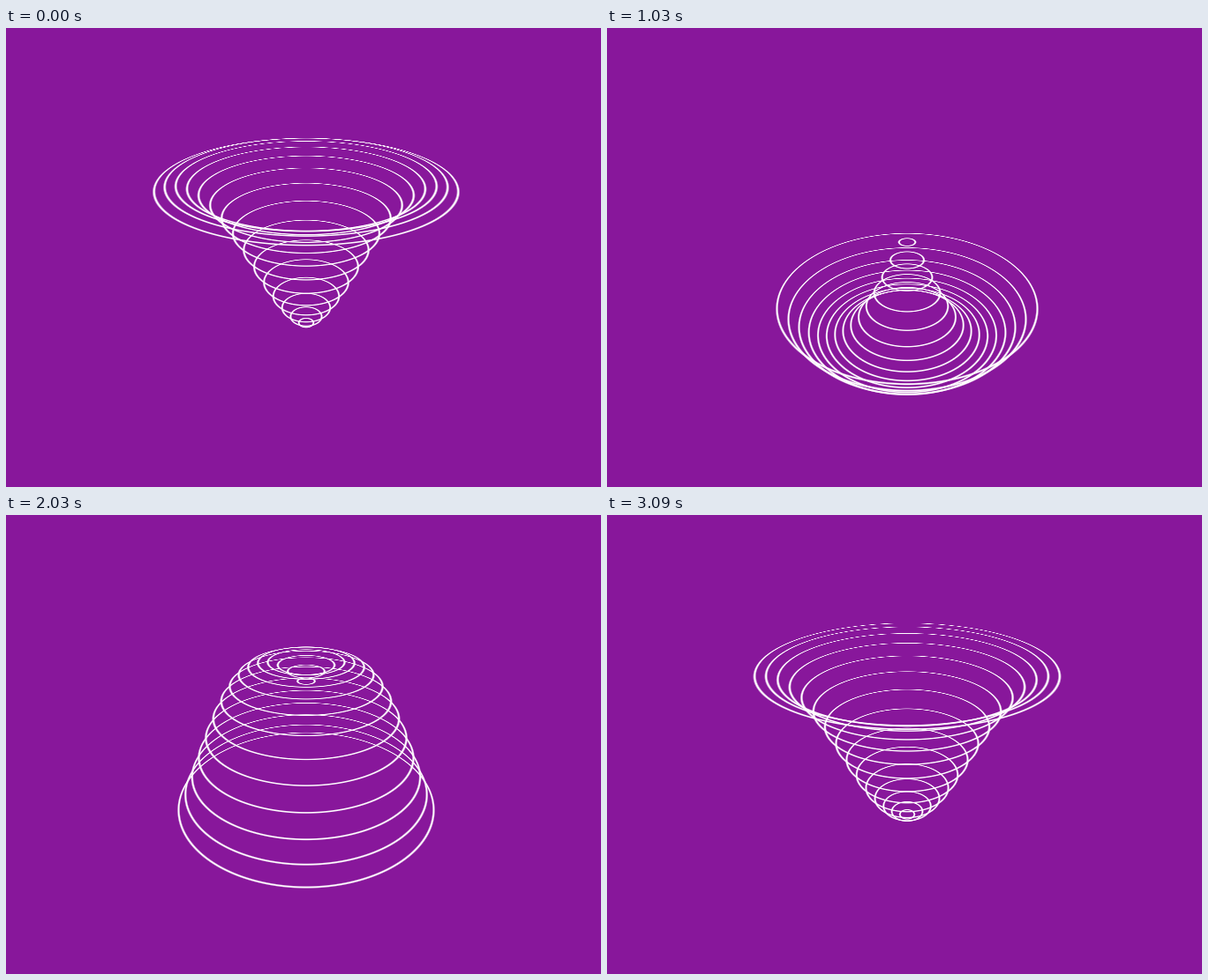
Recreate the animation shown at these times as an HTML page with a canvas. Size 674 by 521 pixels, loop 3.15 s.

```html
<!DOCTYPE html>
<html lang="en">
<head>
<meta charset="utf-8">
<title>Ring wave</title>
<style>
  html, body { margin: 0; width: 100%; height: 100%; overflow: hidden; background: #88179b; }
  canvas { display: block; width: 674px; height: 521px; }
</style>
</head>
<body>
<canvas id="stage" width="674" height="521"></canvas>
<script>
const ctx = document.getElementById('stage').getContext('2d');
const W = 674, H = 521, CX = 340, CY = 262;
const LOOP = 3150, STEPS = 51, EARLY = 33;
const PERIOD = 3000, RINGS = 15, LAG = 100;
const DEPTH = 500, SIN = Math.sin(Math.PI / 3), COS = 0.5;
const LIFT = 100, LINE = 2, SOFT = 1.3;
const BACK = [0x88, 0x17, 0x9b];

const image = ctx.createImageData(W, H);
const cover = new Float32Array(W * H);

const clamp = x => Math.max(0, Math.min(1, x));

function stepAt(t) {
  return Math.min(STEPS - 1, Math.floor((t + EARLY) * STEPS / LOOP));
}

// cubic-bezier(.42, 0, .58, 1)
function easeInOut(x) {
  let lo = 0, hi = 1;
  for (let i = 0; i < 30; i++) {
    const u = (lo + hi) / 2, v = 1 - u;
    if (1.26 * v * v * u + 1.74 * v * u * u + u * u * u < x) lo = u;
    else hi = u;
  }
  return lo * lo * (3 - 2 * lo);
}

function heightAt(ms) {
  const p = (((ms % PERIOD) + PERIOD) % PERIOD) / PERIOD * 2;
  return LIFT * (2 * easeInOut(p < 1 ? p : 2 - p) - 1);
}

// Cast each pixel back onto the tilted plane at height z and sample the ring
// there, so far edges look as crisp as a flat layer turned in 3D.
function ring(radius, z) {
  const mid = radius - LINE / 2, reach = radius + SOFT;
  for (let row = 0; row < H; row++) {
    const v = row + 0.5 - CY;
    const y = (v * (1 - z * COS / DEPTH) + z * SIN) / (COS + v * SIN / DEPTH);
    if (Math.abs(y) > reach) continue;
    const w = 1 - (y * SIN + z * COS) / DEPTH;
    const half = Math.sqrt(reach * reach - y * y) / w;
    const end = Math.min(W - 1, Math.ceil(CX + half));
    for (let col = Math.max(0, Math.floor(CX - half)); col <= end; col++) {
      const x = (col + 0.5 - CX) * w;
      const off = Math.abs(Math.sqrt(x * x + y * y) - mid);
      const a = clamp((LINE / 2 - off) / SOFT + 0.5);
      const i = row * W + col;
      cover[i] += a * (1 - cover[i]);
    }
  }
}

function draw(step) {
  const phase = -220 + 62.6 * step;
  cover.fill(0);
  for (let k = 0; k < RINGS; k++) ring(10 * (k + 1), heightAt(phase - k * LAG));
  for (let i = 0; i < cover.length; i++) {
    for (let c = 0; c < 3; c++) image.data[4 * i + c] = BACK[c] + (255 - BACK[c]) * cover[i];
    image.data[4 * i + 3] = 255;
  }
  ctx.putImageData(image, 0, 0);
}

const start = performance.now();
let shown = -1;
function tick() {
  const step = stepAt((performance.now() - start) % LOOP);
  if (step !== shown) draw(shown = step);
  requestAnimationFrame(tick);
}
tick();
</script>
</body>
</html>
```
